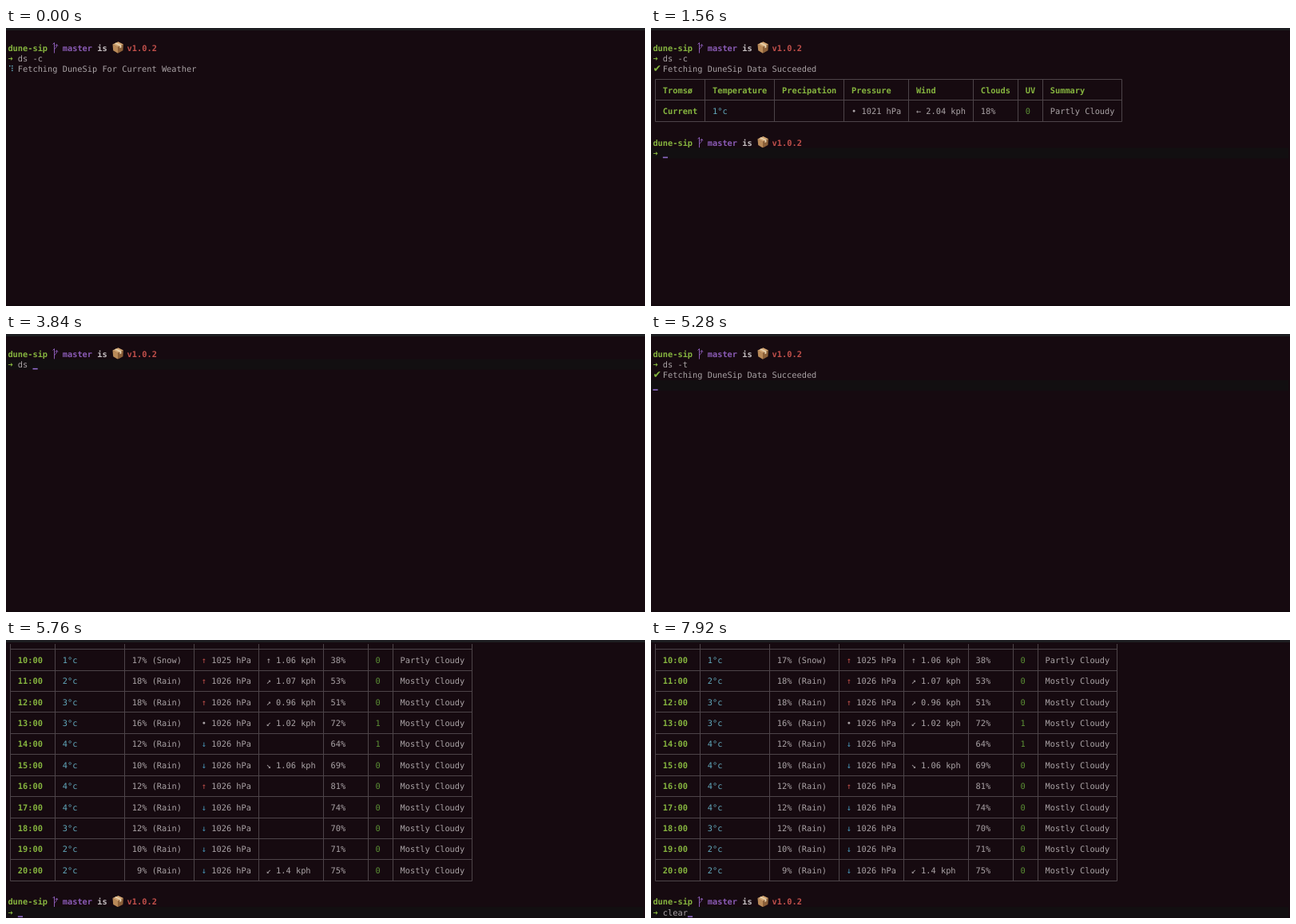
Animation, 800 px wide and 349 px high, one loop 8000 ms. Source, as an HTML page:

```html
<!DOCTYPE html>
<html lang="en">
<head>
<meta charset="utf-8">
<title>Terminal weather</title>
<style>
  html, body { margin: 0; width: 100%; height: 100%; overflow: hidden; background: #160a10; }
  svg { display: block; width: 100vw; height: 100vh; }
  text {
    font: 10.327px "DejaVu Sans Mono", "Liberation Mono", monospace;
    text-rendering: geometricPrecision;
    white-space: pre;
    fill: #aaa3a6;
  }
  .bold { font-weight: bold; }
  .green { fill: #86b53f; }
  .dim { fill: #5c9135; }
  .cyan { fill: #62a9bd; }
  .blue { fill: #4a9cc0; }
  .red { fill: #c2504b; }
  .purple { fill: #8a5bb5; }
  .white { fill: #c6c0c2; }
  .check { font-family: "DejaVu Sans", sans-serif; font-size: 12.5px; }
  .grid { fill: none; stroke: #4d4449; }
</style>
</head>
<body>
<svg viewBox="0 0 800 349">
  <defs>
    <g id="branch" fill="none" stroke="#8a5bb5">
      <path d="M60.5 18.5V31.5M60.5 28C60.5 24.5 63.5 26 63.5 21.5M58.5 20.5L60.5 18.5M61.8 22.5L63.5 20.5L65 22.5"/>
    </g>
    <g id="parcel">
      <path fill="#b98a58" d="M133.5 20.5L140 23.5V31.7L134.2 28.3Z"/>
      <path fill="#8b6039" d="M147 20.5L140 23.5V31.7L146.4 28.3Z"/>
      <path fill="#d3a673" d="M133.5 20.5L140.5 17.3L147 20.5L140 23.8Z"/>
      <path fill="#e8d3b0" d="M136 19.3L137.8 18.5L144.4 21.6V24.5L142.5 25.3V22.4Z"/>
    </g>
  </defs>
  <rect width="800" height="349" fill="#160a10"/>
  <rect width="800" height="3" fill="#1d1e21"/>
  <rect y="347" width="800" height="2" fill="#12080d"/>
  <g id="screen"></g>
</svg>
<script>
const LOOP = 8000, CHAR = 6.217, LINE = 13.2;
const screen = document.getElementById('screen');
const colX = col => 2.4 + col * CHAR;
const midY = line => 11.8 + line * LINE;
const crisp = v => Math.floor(v) + 0.5;

const text = (line, col, str, style = '') =>
  `<text x="${colX(col)}" y="${midY(line) + 3.8}" class="${style}">${str}</text>`;

const cursor = (line, col) =>
  `<rect x="0" y="${midY(line) - 6.6}" width="798" height="13.2" fill="#120f11"/>` +
  `<rect x="${colX(col)}" y="${midY(line) + 4.7}" width="6.2" height="1.6" fill="#8f6bc9"/>`;

const prompt = line =>
  text(line, 0, 'dune-sip', 'bold green') +
  text(line, 11, 'master', 'bold purple') +
  text(line, 18, 'is', 'bold white') +
  text(line, 24, 'v1.0.2', 'bold red') +
  `<g transform="translate(0 ${(line - 1) * LINE})"><use href="#branch"/><use href="#parcel"/></g>`;

const command = (line, typed, active = true) =>
  (active ? cursor(line, 2 + typed.length) : '') +
  text(line, 0, '➜', 'green') + text(line, 2, typed);

const fetching = (period, t) =>
  text(3, 0, '⠋⠙⠹⠸⠼⠴⠦⠧⠇⠏'[(Math.floor(t / 80) + 2) % 10], 'cyan') +
  text(3, 2, `Fetching DuneSip For ${period} Weather`);

const succeeded = () =>
  text(3, 0, '✔', 'check green') + text(3, 2, 'Fetching DuneSip Data Succeeded');

const WIDTHS = [14, 14, 13, 13, 9, 5, 16];
const STYLES = ['bold green', 'cyan', '', '', '', '', 'dim', ''];
const ARROWS = { '↑': 'red', '↓': 'blue' };

// Rows sit on every second line, with a rule between them.
function table(rows, firstCol, topLine, openTop, header) {
  const edges = [0, firstCol];
  WIDTHS.forEach(w => edges.push(edges.at(-1) + w));
  const bottom = topLine + rows.length * 2;
  const left = crisp(colX(0.5)), right = crisp(colX(edges.at(-1) + 0.5));
  const top = openTop ? 5 : crisp(midY(topLine));
  let path = '';
  for (const e of edges) path += `M${crisp(colX(e + 0.5))} ${top}V${crisp(midY(bottom))}`;
  for (let l = topLine; l <= bottom; l += 2) path += `M${left} ${crisp(midY(l))}H${right}`;
  let out = `<path class="grid" d="${path}"/>`;
  rows.forEach((row, r) => row.split('|').forEach((cell, c) => {
    const line = topLine + 1 + r * 2, col = edges[c] + 2;
    if (header && r === 0) out += text(line, col, cell, 'bold green');
    else if (c === 3) {
      out += text(line, col, cell[0], ARROWS[cell[0]]) + text(line, col + 2, cell.slice(2));
    } else out += text(line, col, cell, STYLES[c]);
  }));
  return out;
}

const CURRENT = [
  'Tromsø|Temperature|Precipation|Pressure|Wind|Clouds|UV|Summary',
  'Current|1°c||• 1021 hPa|← 2.04 kph|18%|0|Partly Cloudy'
];
const HOURLY = [
  '1|15% (Snow)|↑ 1025|↑ 1.05 kph|34%|0',
  '1|17% (Snow)|↑ 1025|↑ 1.06 kph|38%|0',
  '2|18% (Rain)|↑ 1026|↗ 1.07 kph|53%|0',
  '3|18% (Rain)|↑ 1026|↗ 0.96 kph|51%|0',
  '3|16% (Rain)|• 1026|↙ 1.02 kph|72%|1',
  '4|12% (Rain)|↓ 1026||64%|1',
  '4|10% (Rain)|↓ 1026|↘ 1.06 kph|69%|0',
  '4|12% (Rain)|↑ 1026||81%|0',
  '4|12% (Rain)|↓ 1026||74%|0',
  '3|12% (Rain)|↓ 1026||70%|0',
  '2|10% (Rain)|↓ 1026||71%|0',
  '2| 9% (Rain)|↓ 1026|↙ 1.4 kph|75%|0'
].map((row, i) => {
  const [temp, rain, pressure, ...rest] = row.split('|');
  const hour = String(9 + i).padStart(2, '0') + ':00';
  return [hour, temp + '°c', rain, pressure + ' hPa', ...rest,
    (i < 2 ? 'Partly' : 'Mostly') + ' Cloudy'].join('|');
});

const typeAt = (str, start, t) =>
  str.slice(0, Math.max(0, Math.floor((t - start) / 120) + 1));

function currentScene(t) {
  let out = prompt(1) + command(2, 'ds -c', false);
  if (t < 480) return out + fetching('Current', t);
  out += succeeded();
  if (t < 600) return out + cursor(4, 0);
  out += table(CURRENT, 10, 4, false, true);
  if (t < 960) return out + cursor(9, 0);
  return out + prompt(10) + command(11, typeAt('clear', 1920, t));
}

function requestScene(t) {
  const typed = t < 3840 ? typeAt('ds', 3360, t) : 'ds' + typeAt(' -t', 3840, t);
  const out = prompt(1) + command(2, typed, t < 4200);
  if (t < 4200) return out;
  if (t < 4440) return out + cursor(3, 0);
  if (t < 5280) return out + fetching('Today', t);
  return out + succeeded() + cursor(4, 0);
}

function hourlyScene(t) {
  if (t < 5760) return cursor(25, 0) + table(HOURLY, 9, 0, true);
  return table(HOURLY.slice(1), 9, 0, true) + prompt(24) +
    command(25, typeAt('clear', 7320, t));
}

function scene(t) {
  if (t < 2640) return currentScene(t);
  if (t < 3000) return cursor(0, 0);
  return t < 5400 ? requestScene(t) : hourlyScene(t);
}

let shown;
const start = performance.now();
function tick() {
  const markup = scene((performance.now() - start) % LOOP);
  if (markup !== shown) screen.innerHTML = shown = markup;
  requestAnimationFrame(tick);
}
tick();
</script>
</body>
</html>
```
